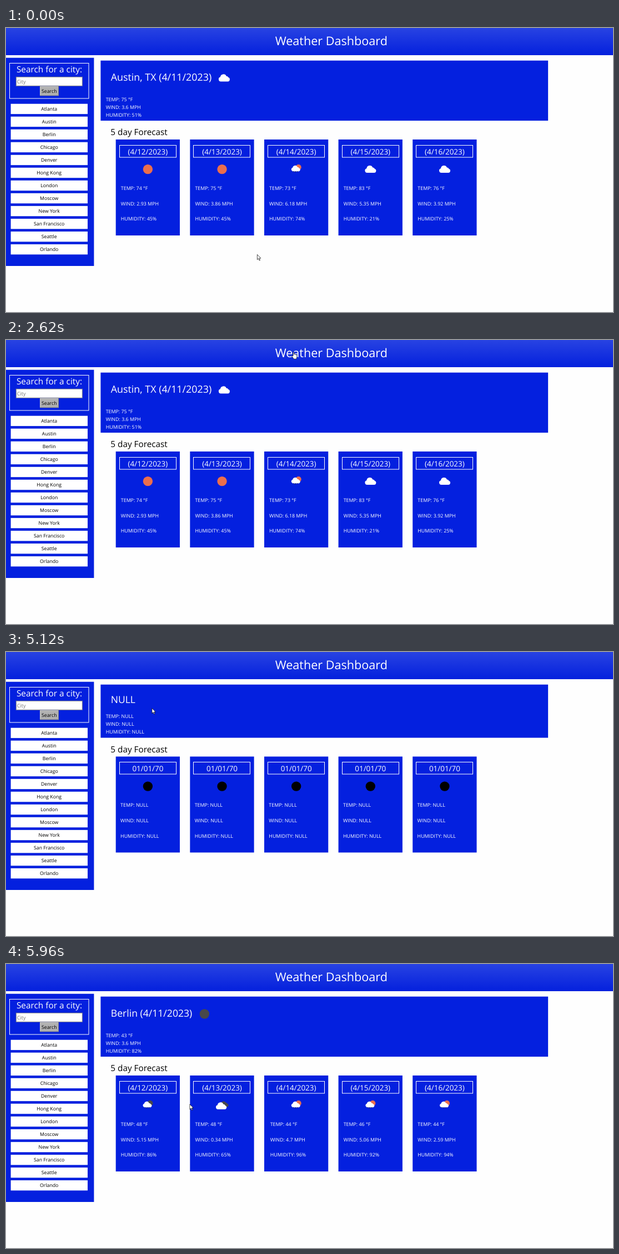
An HTML page for the animation above (8000 ms loop, 1093x512 px).

```html
<!DOCTYPE html>
<html lang="en">
<head>
<meta charset="utf-8">
<title>Weather Dashboard</title>
<style>
  html, body { margin: 0; width: 100%; height: 100%; overflow: hidden; background: #fefefe; }
  svg { display: block; width: 1093px; height: 512px; }
  text { font-family: "Open Sans", "Noto Sans", sans-serif; font-size: 8.87px; fill: #fff; text-rendering: geometricPrecision; }
  .mid { text-anchor: middle; }
  .dark { fill: #000; }
  .item { font-size: 8.72px; }
</style>
</head>
<body>
<svg viewBox="0 0 1093 512">
  <defs>
    <linearGradient id="sky" x2="0" y2="1">
      <stop offset="0" stop-color="#2843e2"/>
      <stop offset="1" stop-color="#0420dd"/>
    </linearGradient>
    <path id="cloud" d="M-6.2 6.5a4.2 4.2 0 0 1-.7-8.2A5.7 5.7 0 0 1 4-3.2A3.7 3.7 0 0 1 7.5-.9A3.8 3.8 0 0 1 6.6 6.5Z"/>
    <path id="drops" d="M-4.6 3.4l-.8 1.6M-1 3.6l-1 2.2M2.6 3.4l-.8 1.6" stroke="#333338" fill="none"/>
    <path id="arrow" d="M.4.4V9.6L2.5 7.6L4.1 11.2L5.5 10.6L4 7.1H6.9Z" fill="#fff" stroke="#000" stroke-width=".7"/>
    <path id="hand" d="M3 8V1.5Q3.9 0 4.8 1.5V5Q5.7 4.2 6.5 5.2Q7.5 4.6 8.2 5.6Q9.6 5.2 9.9 6.6V9.5Q9.7 11 8.8 13.2H4.3L.9 8.5Q.7 7 2 7.2Z" fill="#fff" stroke="#000" stroke-width=".7"/>
  </defs>
  <g id="page"></g>
  <g id="board"></g>
  <path id="caret" d="M291.4 176V196.5" stroke="#111"/>
  <use id="cursor"/>
</svg>
<script>
const BLUE = '#0420df', SUN = '#ec6e4c', NIGHT = '#48484a';
const LOOP = 8000;
const $ = id => document.getElementById(id);

const text = (x, y, s, size, cls = '') =>
  `<text x="${x}" y="${y}" class="${cls}"${size ? ` style="font-size:${size}px"` : ''}>${s}</text>`;
const rect = (x, y, w, h, fill, stroke = 'none') =>
  `<rect x="${x}" y="${y}" width="${w}" height="${h}" fill="${fill}" stroke="${stroke}"/>`;
const disc = (x, y, r, fill) => `<circle cx="${x}" cy="${y}" r="${r}" fill="${fill}"/>`;
const cloud = (x, y, scale, fill) =>
  `<use href="#cloud" transform="translate(${x} ${y}) scale(${scale})" fill="${fill}"/>`;
const rain = fill => disc(4, -3.6, 5.1, fill) + cloud(-1, -1.4, .8, '#fff') + '<use href="#drops"/>';

const icons = {
  none: '',
  sun: disc(0, 0, 8.7, SUN),
  moon: disc(0, 0, 8.7, NIGHT),
  blank: disc(0, 0, 8.7, '#000'),
  cloud: cloud(0, 0, 1, '#fff'),
  broken: cloud(3.8, -2, .78, NIGHT) + cloud(-1.5, 1.2, .96, '#fff'),
  rain: rain(SUN),
  nightRain: rain(NIGHT)
};
const icon = (name, x, y) => `<g transform="translate(${x} ${y})">${icons[name]}</g>`;

const lines = (t, w, h) => [`TEMP: ${t}`, `WIND: ${w}`, `HUMIDITY: ${h}`];
const reading = (t, w, h) => lines(t + ' °F', w + ' MPH', h + '%');
const nulls = lines('NULL', 'NULL', 'NULL');

// Each day: icon, then temperature, wind and humidity
const forecast = days => days.map(([name, ...v], i) =>
  ({ date: `(4/${12 + i}/2023)`, icon: name, rows: reading(...v), x: String(v[1]).length < 4 ? 10.7 : 9.1 }));
const empty = Array.from({ length: 5 }, () => ({ date: '01/01/70', icon: 'blank', rows: nulls, x: 8.4 }));

const austin = {
  title: 'Austin, TX (4/11/2023)', size: 17.85, icon: 'cloud', iconX: 392.8, rows: reading(75, 3.6, 51), rise: 0,
  days: forecast([['sun', 74, 2.93, 45], ['sun', 75, 3.86, 45], ['rain', 73, 6.18, 74],
    ['cloud', 83, 5.35, 21], ['cloud', 76, 3.92, 25]])
};
const blank = { title: 'NULL', size: 17.5, icon: 'none', iconX: 0, rows: nulls, rise: 12.5, days: empty };
const berlin = { title: 'Berlin (4/11/2023)', size: 17.6, icon: 'moon', iconX: 357.4, rows: reading(43, 3.6, 82), rise: 0, days: empty };
const loaded = {
  ...berlin,
  days: forecast([['nightRain', 48, 5.15, 86], ['broken', 48, 0.34, 65], ['rain', 44, 4.7, 96],
    ['rain', 46, 5.06, 92], ['rain', 44, 2.59, 94]])
};
const loading = { ...loaded, days: loaded.days.map((d, i) => i ? d : { ...d, icon: 'blank' }) };

const boards = [[0, austin], [3820, blank], [5270, berlin], [5390, loading], [5960, loaded]];
const carets = [[0, 0], [1550, 1], [2070, 0], [3410, 1], [3820, 0]];

// Pointer: start time, x, y, shape
const pointer = [
  [0, 452, 408, 'arrow'], [500, 466, 366, 'arrow'], [630, 497, 284, 'arrow'], [760, 521, 222, 'arrow'],
  [890, 527, 202, 'arrow'], [1290, 513, 194, 'arrow'], [1680, 514, 172, 'arrow'], [1810, 517, 116, 'arrow'],
  [1940, 520, 52, 'arrow'], [2070, 519, 21, 'hand'], [2210, 524, 11, 'hand'], [2360, 520, 15, 'hand'],
  [2490, 516, 19, 'hand'], [2620, 514, 21, 'hand'], [2750, 430, 72, 'arrow'], [2880, 285, 134, 'arrow'],
  [3010, 164, 172, 'arrow'], [3140, 103, 178, 'arrow'], [3260, 106, 187, 'hand'], [3410, 106, 192, 'hand'],
  [4140, 106, 194, 'hand'], [4970, 133, 173, 'hand'], [5120, 262.5, 101, 'arrow'], [5270, 358.7, 140, 'arrow'],
  [5390, 368, 204, 'arrow'], [5530, 361, 238, 'arrow'], [5680, 346, 247, 'arrow'], [5820, 330.5, 252.5, 'arrow']
];

function drawPage() {
  const cities = ['Atlanta', 'Austin', 'Berlin', 'Chicago', 'Denver', 'Hong Kong', 'London',
    'Moscow', 'New York', 'San Francisco', 'Seattle', 'Orlando'];
  return rect(0, 0, 1093, 49, 'url(#sky)') + text(585.8, 31, 'Weather Dashboard', 21.6, 'mid')
    + rect(0, 53.7, 158.4, 375.3, BLUE) + rect(6.5, 63.5, 142.5, 63.5, 'none', '#fff')
    + text(78, 79.5, 'Search for a city:', 15.4, 'mid')
    + rect(18.3, 88.3, 119, 16, '#fff', '#858585')
    + '<g opacity=".55">' + text(19.8, 99.8, 'City', 9, 'dark') + '</g>'
    + rect(61, 105, 34, 17.2, '#b1b1b1') + '<path d="M61.5 122V105.5H95" fill="none" stroke="#c9c9c9"/>'
    + '<path d="M61 121.7H94.5V105" fill="none" stroke="#858585"/>'
    + text(77.8, 116.9, 'Search', 8.75, 'mid dark')
    + cities.map((c, i) => rect(8.6, 136.7 + i * 23.02, 138.4, 18.4, '#fff')
      + text(77.7, (149.1 + i * 23.02).toFixed(2), c, 0, 'mid dark item')).join('');
}

function drawCard(day, i, rise) {
  const x = 197.7 + i * 133.63, mid = x + 57.7;
  return rect(x, 201 - rise, 115.3, 173, BLUE)
    + rect(Math.round(x + 6) + .5, Math.round(210.6 - rise) + .5, 102, 21.6, 'none', '#fff')
    + text(mid, 227.6 - rise, day.date, 13.45, 'mid')
    + icon(day.icon, mid, 254.6 - rise)
    + day.rows.map((s, n) => text(x + day.x, 291.9 + n * 27.7 - rise, s)).join('');
}

function drawBoard(b) {
  return rect(170.4, 58.7, 805.7, 108.4 - b.rise, BLUE)
    + text(188.8, b.rise ? 91.6 : 94.6, b.title, b.size) + icon(b.icon, b.iconX, 90)
    + b.rows.map((s, n) => text(179.7, 131.8 + n * 13.85 - b.rise, s)).join('')
    + `<g style="--ink:#212529">${text(188.3, 193 - b.rise, '5 day Forecast', 15.3, 'dark')}</g>`
    + b.days.map((d, i) => drawCard(d, i, b.rise)).join('');
}

const at = (steps, t) => steps.findLast(s => s[0] <= t);
let shown;

function frame(now) {
  const t = now % LOOP;
  const board = at(boards, t)[1];
  if (board !== shown) $('board').innerHTML = drawBoard(shown = board);
  $('caret').style.visibility = at(carets, t)[1] ? 'visible' : 'hidden';
  const [, x, y, shape] = at(pointer, t);
  $('cursor').setAttribute('href', '#' + shape);
  $('cursor').setAttribute('transform', `translate(${x} ${y})`);
  requestAnimationFrame(frame);
}

$('page').innerHTML = drawPage();
frame(performance.now());
</script>
</body>
</html>
```
